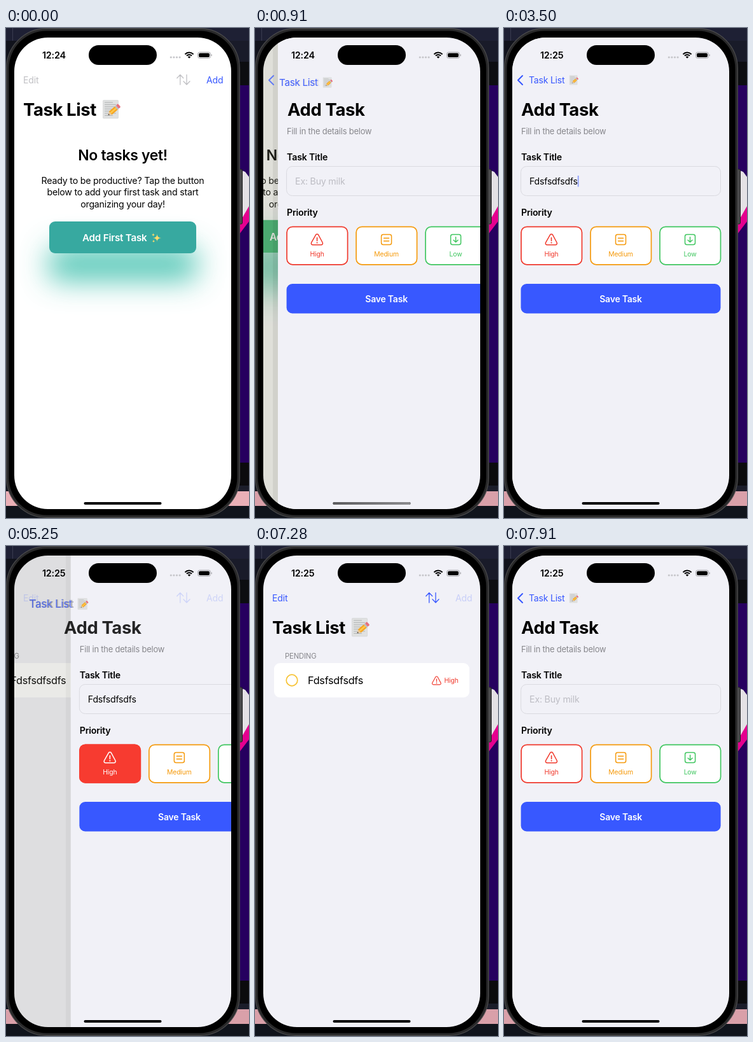
Write an HTML page with a canvas that moves like this. It is 382 px wide and 770 px high and loops after 8000 ms.

```html
<!DOCTYPE html>
<html lang="en">
<head>
<meta charset="utf-8">
<title>Task list</title>
<style>
html, body { margin: 0; width: 100%; height: 100%; overflow: hidden; background: #10141c; }
canvas { display: block; }
</style>
</head>
<body>
<canvas id="stage" width="382" height="770"></canvas>
<script>
const c = document.getElementById('stage').getContext('2d');
const LOOP = 8000, W = 341, LEFT = 13;
const PUSH = 668, POP = 5196, PUSH_AGAIN = 7330;
const BLUE = '#3858ff', RED = '#f0392c', ORANGE = '#f59a0c', GREEN = '#3fc65f', PAGE = '#f1f1f7';

const clamp = v => Math.max(0, Math.min(1, v));
const mix = (a, b, k) => a + (b - a) * k;
const mixRgb = (a, b, k, alpha = 1) => `rgba(${a.map((v, i) => Math.round(mix(v, b[i], k)))},${alpha})`;
const ramp = (t, from, to) => clamp((t - from) / (to - from));
const spring = ms => { const x = Math.max(0, ms) * 0.018; return 1 - (1 + x) * Math.exp(-x); };

function rect(x, y, w, h, color) { c.fillStyle = color; c.fillRect(x, y, w, h); }

function box(x, y, w, h, r, fill, stroke, lineWidth = 1) {
  c.beginPath();
  c.roundRect(x, y, w, h, r);
  if (fill) { c.fillStyle = fill; c.fill(); }
  if (stroke) { c.strokeStyle = stroke; c.lineWidth = lineWidth; c.stroke(); }
}

function poly(fill, ...p) {
  c.beginPath();
  for (let i = 0; i < p.length; i += 2) c.lineTo(p[i], p[i + 1]);
  c.closePath();
  c.fillStyle = fill;
  c.fill();
}

function lines(color, width, ...paths) {
  c.strokeStyle = color;
  c.lineWidth = width;
  c.lineCap = c.lineJoin = 'round';
  c.beginPath();
  for (const p of paths)
    for (let i = 0; i < p.length; i += 2) c[i ? 'lineTo' : 'moveTo'](p[i], p[i + 1]);
  c.stroke();
}

function dot(x, y, r, color) {
  c.beginPath();
  c.arc(x, y, r, 0, 7);
  c.fillStyle = color;
  c.fill();
}

// y is the middle of the capital letters
function text(str, x, y, size, color, weight = 400, align = 'left') {
  c.font = `${weight} ${size}px Inter, sans-serif`;
  c.letterSpacing = -0.015 * size + 'px';
  c.textAlign = align;
  c.fillStyle = color;
  c.fillText(str, x, y + size * 0.364);
  return c.measureText(str).width;
}

function group(alpha, x, y, scale, draw) {
  if (alpha <= 0) return;
  c.save();
  c.globalAlpha *= alpha;
  c.translate(x, y);
  c.scale(scale, scale);
  draw();
  c.restore();
}

function memo(x, y) {
  group(1, x, y, 1, () => {
    box(0, -14.5, 24, 28.5, 1, '#e0e1e1', '#cfd0d0', 0.6);
    for (let i = 0; i < 7; i++) lines('#a3a6a8', 0.8, [3, -11 + i * 3.4, i % 3 ? 20 : 15, -11 + i * 3.4]);
    c.translate(8, 9);
    c.rotate(-0.72);
    poly('#e9c79a', 0, 0, 5, -3.5, 5, 3.5);
    poly('#444', 0, 0, 2, -1.4, 2, 1.4);
    rect(5, -3.5, 12, 7, '#f5a623');
    rect(5, -1.2, 12, 2.4, '#ffc94d');
    rect(17, -3.5, 2.5, 7, '#b9bcc0');
    box(19.5, -3.5, 4, 7, 1.5, '#e8707c');
  });
}

function star(x, y, r) {
  c.beginPath();
  c.moveTo(x, y - r);
  for (const [dx, dy] of [[r, 0], [0, r], [-r, 0], [0, -r]])
    c.quadraticCurveTo(x, y, x + dx, y + dy);
  c.fillStyle = '#ffdc6b';
  c.fill();
}

function warning(x, y, s, color) {
  group(1, x, y, s, () => {
    c.beginPath();
    c.moveTo(0, -8.5);
    c.arcTo(1.5, -8.5, 9.5, 6, 2);
    c.arcTo(10.5, 8.3, 0, 8.3, 2.4);
    c.arcTo(-10.5, 8.3, -9.5, 6, 2.4);
    c.arcTo(-1.5, -8.5, 0, -8.5, 2);
    c.closePath();
    c.strokeStyle = color;
    c.lineWidth = 1.5;
    c.lineJoin = 'round';
    c.stroke();
    lines(color, 1.6, [0, -3, 0, 2]);
    dot(0, 5, 1.1, color);
  });
}

function mediumIcon(x, y, color) {
  box(x - 8, y - 8, 16, 16, 3, null, color, 1.5);
  lines(color, 1.5, [x - 4, y - 2.3, x + 4, y - 2.3], [x - 4, y + 2.3, x + 4, y + 2.3]);
}

function lowIcon(x, y, color) {
  box(x - 8, y - 8, 16, 16, 3, null, color, 1.5);
  lines(color, 1.5, [x, y - 4, x, y + 4], [x - 3.5, y + 0.7, x, y + 4, x + 3.5, y + 0.7]);
}

function backdrop(t) {
  rect(0, 0, 382, 770, '#11131c');
  rect(0, 0, 382, 20, '#1e2034');
  rect(10, 0, 1, 20, '#3a3c50');
  rect(340, 20, 42, 33, '#191b29');
  rect(340, 53, 42, 37, '#0c0d11');
  rect(340, 90, 42, 593, '#26005f');
  poly('#e4e1e5', 366, 222, 376, 226, 382, 234, 382, 281, 366, 309);
  poly('#e5008f', 382, 280, 382, 304, 366, 325, 366, 308);
  rect(340, 683, 42, 36, '#0b0b0d');
  rect(340, 719, 42, 9, '#1b1d2a');
  rect(0, 728, 382, 23, t < 70 ? '#eab0b7' : '#d9a0a9');
  rect(0, 751, 382, 19, '#10141c');
  box(366, 222, 5.5, 86, 2, '#4a4a4c', '#1c1c1e');
  box(0.7, 0.7, 366.6, 768.6, 63, '#29292a', '#4c4c4d', 1.2);
  box(4.5, 4.5, 359, 761, 59, '#000');
}

function emptyList(t) {
  rect(LEFT, 15, W, 742, '#fff');
  const mid = 183.5, k = Math.min(t / 700, 1.8);
  text('No tasks yet!', mid, 199.5, 23, '#000', 600, 'center');
  ['Ready to be productive? Tap the button', 'below to add your first task and start', 'organizing your day!']
    .forEach((s, i) => text(s, mid, 239.5 + i * 18.7, 14.2, '#000', 400, 'center'));
  const w = mix(231, 244.5, k), h = mix(50, 51, k), y = mix(329, 327.8, k);
  c.save();
  c.shadowColor = mixRgb([55, 189, 170], [32, 181, 142], k, 0.87);
  c.shadowBlur = mix(46, 58, k);
  c.shadowOffsetY = mix(42, 46, k);
  box(mid - w / 2, y - h / 2, w, h, 9, mixRgb([55, 169, 160], [60, 181, 128], k));
  c.restore();
  group(1, mid, y, 1 + 0.02 * k, () => {
    text('Add First Task', -63.5, 0.5, 15.2, '#fff', 600);
    star(54, 1, 6.5);
    star(48, -4, 3);
    star(48.5, 6, 2.8);
  });
}

function filledList() {
  rect(LEFT - 110, 15, W + 110, 742, PAGE);
  text('PENDING', 47, 172.5, 11.3, '#87878c');
  box(30, 184, 307, 54, 9, '#fff');
  c.beginPath();
  c.arc(58, 211, 8.8, 0, 7);
  c.strokeStyle = '#f7c232';
  c.lineWidth = 1.7;
  c.stroke();
  text('Fdsfsdfsdfs', 83, 211.5, 16.2, '#000');
  warning(285.5, 211.5, 0.76, RED);
  text('High', 297.5, 211.5, 10.4, RED);
}

function addForm(t) {
  const first = t < 6500;
  rect(LEFT, 15, W, 742, PAGE);
  text('Fill in the details below', 27, 162.5, 12.9, '#87878c');
  text('Task Title', 27, 202.5, 14.2, '#000', 600);
  box(26.5, 217.5, 314, 46, 9, null, '#dadae0');
  const step = Math.floor((t - 2450) / 70) + 1;
  const typed = first ? 'Fdsfsdfsdfs'.slice(0, Math.max(0, Math.round(step * 11 / 7))) : '';
  const w = typed ? text(typed, 40, 241, 14.1, '#000') : 0;
  if (!typed) text('Ex: Buy milk', 40, 241, 14.2, '#bdbdc4');
  const caret = ramp(t, 1810, 1820) - ramp(t, 3450, 3560) + ramp(t, 3840, 3990)
    - ramp(t, 4480, 4620) + ramp(t, 4890, 5040) - ramp(t, 5180, 5190);
  group(clamp(caret), 0, 0, 1, () => rect(40 + w, 232, 1.8, 17.5, BLUE));

  text('Priority', 27, 289.5, 14.2, '#000', 600);
  const picked = first ? ramp(t, 3990, 4400) : 0;
  [['High', RED, (x, y, col) => warning(x, y, 1, col)], ['Medium', ORANGE, mediumIcon], ['Low', GREEN, lowIcon]]
    .forEach(([label, color, icon], i) => {
      const x = 74.5 + i * 109;
      const face = col => {
        icon(x, 332.5, col);
        text(label, x, 355.5, 10.4, col, 400, 'center');
      };
      box(x - 47.5, 312.3, 95.5, 59.5, 9, '#fff', color, 1.7);
      face(color);
      if (!i) group(picked, 0, 0, 1, () => {
        box(x - 48.3, 311.5, 97, 61, 9.5, '#f73b30');
        face('#fff');
      });
    });

  box(26.5, 402, 314, 46.5, 9, BLUE);
  text('Save Task', 183.5, 426, 14, '#fff', 600, 'center');
}

function navBar(t, shown, popping) {
  const off = (1 - shown) * W, hasTasks = t > 4000;
  const tint = hasTasks ? BLUE : '#c0c0c4';
  group(clamp(1.15 - 1.3 * shown), 0, 0, 1, () => {
    text('Edit', 27, 82, 14.1, tint);
    lines(tint, 1.3, [273.8, 73.5, 273.8, 89], [268.8, 78.7, 273.8, 73.5, 278.8, 78.7],
      [284, 73.5, 284, 89], [279, 83.8, 284, 89, 289, 83.8]);
    group(t >= 7280 ? 0.22 : 1, 0, 0, 1, () => text('Add', 315, 82, 14.1, BLUE));
  });

  // the large title shrinks into the back button
  const m = popping ? 1 - Math.pow(1 - shown, 1.2) : Math.pow(shown, 1.2);
  group(1, mix(27, 39, m), mix(128, 82, m), mix(1, 0.51, m), () => {
    group(1 - shown, 0, 0, 1, () => text('Task List', 0, 0, 27.5, '#000', 700));
    group(shown, 0, 0, 1, () => text('Task List', 0, 0, 27.5, BLUE));
    memo(125.5, 0);
  });
  group(clamp(4 * shown - 3), 0, 0, 1, () => lines(BLUE, 2, [29, 75, 22, 82, 29, 89]));

  const alpha = popping ? 1 - Math.pow(1 - shown, 1.4) : clamp(2 * shown);
  group(alpha, off * (popping ? 0.72 : 1.04), 0, 1, () => text('Add Task', 27, 128, 27.5, '#000', 700));
}

function statusBar(t) {
  text(t < 1540 ? '12:24' : '12:25', 57, 43, 14.4, '#000', 600);
  box(130, 27, 107, 31, 15.5, '#000');
  for (let i = 0; i < 4; i++) dot(259.3 + i * 4.6, 46, 1.6, '#c6c6ca');
  c.strokeStyle = '#000';
  c.lineWidth = 2;
  c.lineCap = 'butt';
  for (const r of [9, 5.6]) {
    c.beginPath();
    c.arc(288, 47.5, r, -Math.PI * 0.76, -Math.PI * 0.24);
    c.stroke();
  }
  poly('#000', 288, 47.8, 285.6, 45.2, 288, 44.2, 290.4, 45.2);
  box(301.5, 38, 20, 9.5, 3, null, '#a5a5a9');
  box(303, 39.5, 17, 6.5, 2, '#000');
  box(322.5, 41.2, 1.2, 3, 0.6, '#a5a5a9');

  box(122.5, 745, 122, 4, 2, '#000');
  const grey = c.createLinearGradient(122, 0, 244, 0);
  grey.addColorStop(0, '#5c5c5e');
  grey.addColorStop(1, '#8b8b8e');
  group(ramp(t, 560, 700) - ramp(t, 1750, 1890), 0, 0, 1, () => box(122.5, 745, 122, 4, 2, grey));
}

function draw(t) {
  const popping = t >= POP && t < PUSH_AGAIN;
  const shown = spring(t - PUSH) - spring(t - POP) + spring(t - PUSH_AGAIN);
  const off = (1 - shown) * W;
  backdrop(t);
  c.save();
  c.beginPath();
  c.roundRect(LEFT, 15, W, 741, 53);
  c.clip();
  group(1, -0.3 * shown * W, 0, 1, () => t < 4000 ? emptyList(t) : filledList());
  rect(LEFT, 15, off, 742, `rgba(118,118,96,${0.27 * shown * shown})`);
  rect(LEFT + off - 8, 15, 8, 742, `rgba(0,0,0,${0.07 * shown * shown})`);
  if (shown > 0) group(1, off, 0, 1, () => addForm(t));
  navBar(t, shown, popping);
  statusBar(t);
  c.restore();
}

function tick() {
  draw(performance.now() % LOOP);
  requestAnimationFrame(tick);
}
tick();
</script>
</body>
</html>
```
